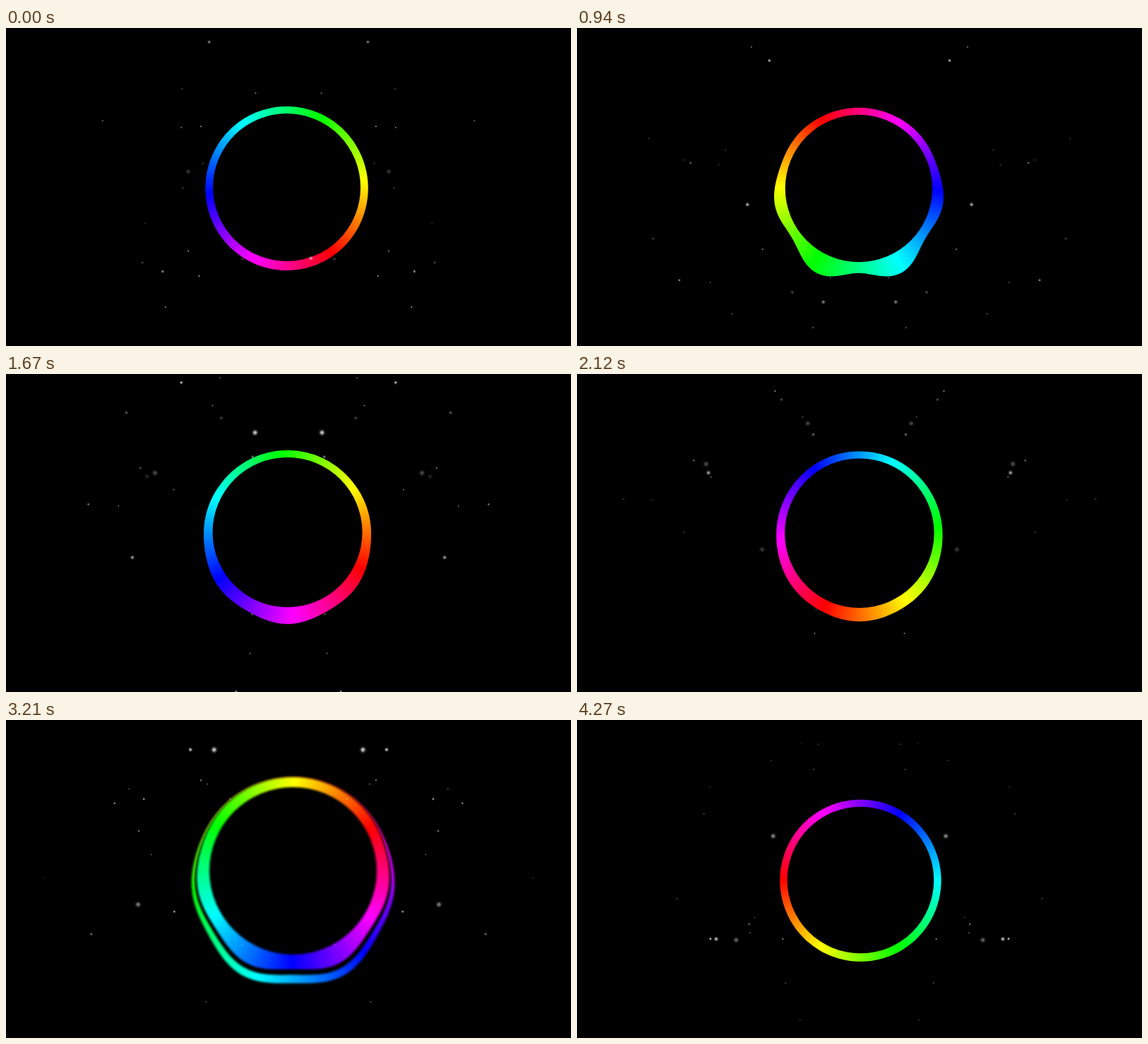
Animation, 800 px wide and 450 px high, one loop 4300 ms. Source, as an HTML page with a canvas:

```html
<!DOCTYPE html>
<html lang="en">
<head>
<meta charset="utf-8">
<title>Spectrum ring</title>
<style>
  html, body { margin: 0; width: 100%; height: 100%; overflow: hidden; background: #000; }
  canvas { display: block; width: 800px; height: 450px; }
</style>
</head>
<body>
<canvas id="stage" width="800" height="450"></canvas>
<script>
const ctx = document.getElementById('stage').getContext('2d');
const W = 800, H = 450, LOOP = 4300;
const TAU = Math.PI * 2, RAD = Math.PI / 180;
const HUE_START = 145, HUE_SPEED = 0.198;
const LOBE = 56;          // degrees between two bulges
const HIT = 3210;         // time of the loud beat
const STARS = 17;

// swell: height of the bulges; ripple: how deep the dips between them are
const POSES = [
  { t: 0,    x: 397.5, y: 225.5, r: 104.5, swell: 3,   ripple: 0 },
  { t: 940,  x: 399,   y: 227,   r: 104.2, swell: 14,  ripple: 0.6 },
  { t: 1670, x: 398.5, y: 224,   r: 106,   swell: 12,  ripple: -0.15 },
  { t: 2610, x: 401.5, y: 226.5, r: 105.5, swell: 3.5, ripple: 0 },
  { t: HIT,  x: 406.5, y: 213.5, r: 118.5, swell: 11,  ripple: 0.4 },
  { t: 3760, x: 402,   y: 226.5, r: 104,   swell: 2.5, ripple: 0.2 },
  { t: 4270, x: 401.5, y: 226.5, r: 103.8, swell: 1.5, ripple: 0 }
];

const mix = (a, b, u) => a + (b - a) * u;
const bell = (v, width) => Math.exp(-((v / width) ** 2));

function random(seed) {
  const v = Math.sin(seed * 127.1 + 311.7) * 43758.5453;
  return v - Math.floor(v);
}

function poseAt(t) {
  let i = 0;
  while (i < POSES.length - 2 && t >= POSES[i + 1].t) i++;
  const a = POSES[i], b = POSES[i + 1];
  const u = Math.min(1, (t - a.t) / (b.t - a.t));
  const ease = u * u * (3 - 2 * u);
  const pose = { hit: bell(t - HIT, t < HIT ? 450 : 280) };
  for (const key of ['x', 'y', 'r', 'swell', 'ripple']) pose[key] = mix(a[key], b[key], ease);
  pose.swell *= 1 + 0.2 * Math.sin(Math.PI * u) * Math.sin(t * 0.012);
  return pose;
}

// deg is measured from the bottom; both sides are mirror images
function radius(p, deg, echo) {
  const lobes = 1 - p.ripple * Math.cos(deg / LOBE * TAU);
  return p.r + 10 + 4 * p.hit ** 2
    + p.swell * bell(deg, 75) * lobes
    + echo * 20 * p.hit * bell(deg, 85);
}

function fillShape(p, echo, paint) {
  ctx.beginPath();
  for (let deg = -180; deg < 180; deg += 2) {
    const d = radius(p, deg, echo);
    ctx.lineTo(p.x + Math.sin(deg * RAD) * d, p.y + Math.cos(deg * RAD) * d);
  }
  ctx.closePath();
  ctx.fillStyle = paint;
  ctx.fill();
}

function rainbow(p, hue) {
  const g = ctx.createConicGradient(-Math.PI / 2 + hue * RAD, p.x, p.y);
  for (let i = 0; i <= 6; i++) g.addColorStop(i / 6, `hsl(${(360 - i * 60) % 360}, 100%, 50%)`);
  return g;
}

function ring(p, hue) {
  const blur = 1.7 * p.hit ** 2;
  ctx.filter = blur > 0.1 ? `blur(${blur}px)` : 'none';
  if (p.hit > 0.03) {
    fillShape(p, 1, rainbow(p, hue - 42));
    fillShape(p, 0.4, '#000');
  }
  fillShape(p, 0, rainbow(p, hue));
  ctx.beginPath();
  ctx.arc(p.x, p.y, p.r, 0, TAU);
  ctx.fillStyle = '#000';
  ctx.fill();
  ctx.filter = 'none';
}

function dot(x, y, r, alpha) {
  const g = ctx.createRadialGradient(x, y, 0, x, y, r);
  const stop = (at, k) => g.addColorStop(at, `rgba(255, 255, 255, ${alpha * k})`);
  stop(0, 1);
  stop(0.35, 0.8);
  stop(0.55, 0.28);
  stop(1, 0);
  ctx.fillStyle = g;
  ctx.fillRect(x - r, y - r, r * 2, r * 2);
}

// mirrored pairs drift outwards, fade and start again somewhere else
function stars(t, p) {
  for (let i = 0; i < STARS; i++) {
    const life = 900 + 700 * random(i);
    const age = t / life + random(i + 40);
    const u = age % 1;
    const seed = 100 + i * 37 + Math.floor(age) * 7;
    const angle = (0.08 + 0.84 * random(seed)) * Math.PI;
    const dist = 115 + 150 * random(seed + 1) + 110 * u * u;
    const size = 1.6 + 4.2 * random(seed + 2) ** 3;
    const alpha = Math.sqrt(Math.sin(Math.PI * u)) * mix(0.3, 0.9, random(seed + 3));
    const dx = Math.sin(angle) * dist, y = 225 - Math.cos(angle) * dist * 0.85;
    for (const x of [W / 2 - dx, W / 2 + dx]) {
      if (Math.hypot(x - p.x, y - p.y) > p.r) dot(x, y, size, alpha);
    }
  }
}

function draw(t) {
  const pose = poseAt(t);
  ctx.fillStyle = '#000';
  ctx.fillRect(0, 0, W, H);
  ring(pose, HUE_START + t * HUE_SPEED);
  stars(t, pose);
}

const start = performance.now();
function tick() {
  draw((performance.now() - start) % LOOP);
  requestAnimationFrame(tick);
}
tick();
</script>
</body>
</html>
```
